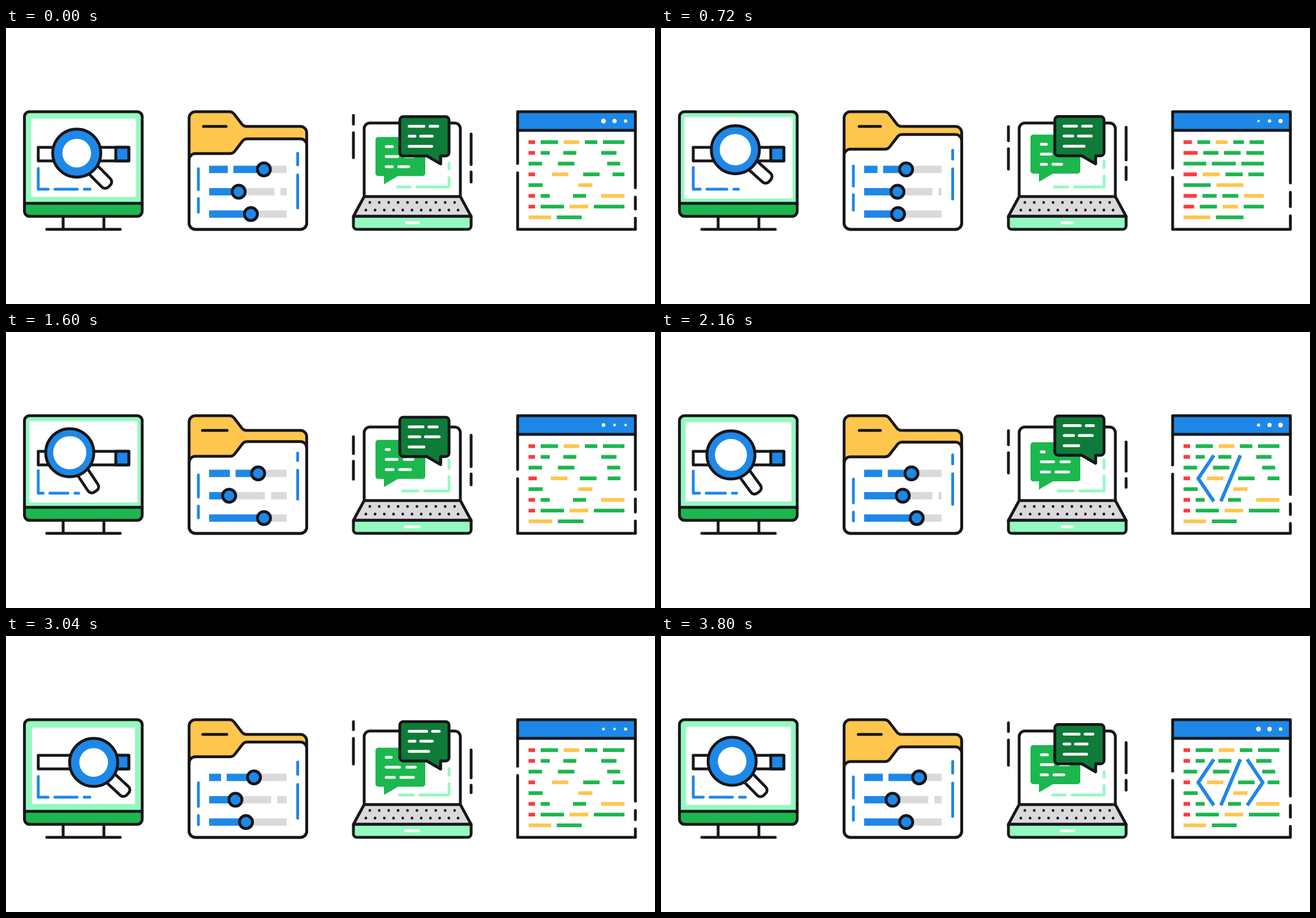
Animation of 1147 by 488 pixels, one loop 3.84 s. Source, as an HTML page with a canvas:

```html
<!DOCTYPE html>
<html lang="en">
<head>
<meta charset="utf-8">
<title>Four icons</title>
<style>
html, body { margin: 0; width: 100%; height: 100%; overflow: hidden; background: #fff; }
canvas { display: block; }
</style>
</head>
<body>
<canvas id="stage" width="1147" height="488"></canvas>
<script>
const ctx = document.getElementById('stage').getContext('2d');
const INK = '#17161a', BLUE = '#1e88e8', GREEN = '#1cb74e', MINT = '#94f9bf', DARK = '#0f7b38',
      YELLOW = '#ffc64d', GRAY = '#dadada', KEYS = '#dbd9da', RED = '#ff3b3d', WHITE = '#fff';
const LOOP = 3840;
let now = 0;

// Cosine swing from -1 to 1; peak is the part of the loop where it is highest
const swing = (peak, cycles = 1) => Math.cos(2 * Math.PI * cycles * (now / LOOP - peak));

function ease(from, to) {
  const u = Math.min(1, Math.max(0, (now - from) / (to - from)));
  return u * u * (3 - 2 * u);
}

function paint(fill, stroke) {
  if (fill) { ctx.fillStyle = fill; ctx.fill(); }
  if (stroke) { ctx.strokeStyle = stroke; ctx.stroke(); }
}

function line(color, ...xy) {
  ctx.beginPath();
  for (let i = 0; i < xy.length; i += 2) ctx.lineTo(xy[i], xy[i + 1]);
  paint(null, color);
}
const across = (color, y, x1, x2) => line(color, x1, y, x2, y);
const down = (color, x, y1, y2) => line(color, x, y1, x, y2);

function box(x1, y1, x2, y2, r, fill, stroke) {
  ctx.beginPath();
  ctx.roundRect(x1, y1, x2 - x1, y2 - y1, r);
  paint(fill, stroke);
}

function disc(x, y, r, fill, stroke) {
  ctx.beginPath();
  ctx.arc(x, y, r, 0, 7);
  paint(fill, stroke);
}

// Polygon with rounded corners
function shape(points, r, fill, stroke) {
  const [ax, ay] = points[0], [bx, by] = points[points.length - 1];
  ctx.beginPath();
  ctx.moveTo((ax + bx) / 2, (ay + by) / 2);
  points.forEach(([x, y], i) => ctx.arcTo(x, y, ...points[(i + 1) % points.length], r));
  ctx.closePath();
  paint(fill, stroke);
}

function monitor() {
  const inset = 43.4 + 2.6 * swing(0.8), wave = swing(0.9);
  box(32.6, 148, 240.7, 333, 9, MINT);
  box(inset, 116 + inset, 274 - inset, 343 - inset, 0, WHITE);
  box(32.6, 310, 240.7, 333, [0, 0, 9, 9], GREEN);
  across(INK, 310, 32.6, 240.7);
  box(32.6, 148, 240.7, 333, 9, null, INK);
  down(INK, 101, 333, 355);
  down(INK, 173, 333, 355);
  across(INK, 356, 72, 202);

  const turn = 70.5 + 5 * wave, dash = turn + 12, dot = dash + 48.5 + 4.2 * wave;
  line(BLUE, 57, 247 + 2 * wave, 57, 285, turn, 285);
  across(BLUE, 285, dash, dot - 12.5);
  across(BLUE, 285, dot, dot + 8.5 + 2 * wave);

  box(57, 211, 217, 235, 0, WHITE, INK);
  box(194, 211, 217, 235, 0, BLUE, INK);

  ctx.save();
  ctx.translate(131.4 + 14 * swing(0.817) + 12.2 * swing(0.24, 2), 218.3 + 5.5 * swing(0.84));
  ctx.save();
  ctx.rotate((47.4 + 5.9 * swing(0.48) + 4.2 * swing(0.463, 2)) * Math.PI / 180);
  box(38, -10.5, 82, 10.5, [0, 8, 8, 0], WHITE, INK);
  ctx.restore();
  disc(0, 0, 42.5, BLUE, INK);
  disc(0, 0, 27.1 - 2.2 * wave, WHITE);
  ctx.restore();
}

function slider(y, knob, ...pieces) {
  for (const [color, x1, x2] of pieces) box(x1, y - 6.5, x2, y + 6.5, 0, color);
  disc(knob, y, 11.5, BLUE, INK);
}

function folder() {
  const sheet = (top, step, bend) => shape([[323.6, top], [bend, top], [bend + 20, step],
    [531.4, step], [531.4, 356], [323.6, 356]], 11, top > 148 ? WHITE : YELLOW, INK);
  const front = 217.5 + 4.5 * swing(0, 2), label = 20.2 - 2 * swing(0.12, 2);
  sheet(148, 174, 400);
  sheet(front, front - 26, 401);
  across(INK, 174, 369 - label, 369 + label);

  const quick = swing(0.47, 2);
  const split = 387.3 + 7 * quick - 3.2 * swing(0.85);
  const a = 442.1 + 4.5 * swing(0.95) + 10.1 * quick;
  const b = 411 + 18 * swing(0.12, 2) + 5 * swing(0.72), stop = Math.min(479.5, b + 63);
  const c = 435 + 13.3 * swing(0.5) + 12 * quick;
  slider(250, a, [BLUE, 359, split], [BLUE, split + 10, a], [GRAY, a, 496]);
  slider(289.5, b, [BLUE, 359, b], [GRAY, b, stop], [GRAY, stop + 11, 496]);
  slider(329, c, [BLUE, 359, c], [GRAY, c, 496]);

  const left = swing(0.67), right = swing(0.86);
  down(BLUE, 340, 253 + 9 * left, 292 + 12.7 * left);
  down(BLUE, 340, 308 + 13.3 * left, 328.7 + 6.7 * left);
  down(BLUE, 515.5, 218.5 + 4.7 * right, 236 + 9.3 * right);
  down(BLUE, 515.5, 253.5 + 9.8 * right, 309 + 14.5 * right);
}

function laptop() {
  const a = swing(0), b = swing(0.74), c = swing(0.67), d = swing(0.4), e = swing(0.375);
  box(633, 168, 803, 310, 10, WHITE, INK);

  const run = 733.5 - 7.3 * a;
  down(MINT, 783, 232.5 + 7 * a, 245 + 4.3 * a);
  line(MINT, 783, 259.7 + 4.7 * a, 783, 281, run, 281);
  across(MINT, 281, 697 - 5 * a, run - 12);

  // Light bubble
  const y = 193 + 4.8 * b, gap = 692.4 + 3.3 * b, end = 684.2 + 3 * c;
  box(653, y, 741, y + 69, 5, GREEN);
  shape([[668, y + 66], [668, y + 83.5], [696, y + 67]], 0, GREEN);
  across(WHITE, y + 17, 672, 680 + 2.9 * a);
  across(WHITE, y + 34.5, 672, gap);
  across(WHITE, y + 34.5, gap + 13, 720.5 + 3 * b);
  across(WHITE, y + 52.5, 672, end);
  across(WHITE, y + 52.5, end + 11.5, 715 + 7 * c);

  // Dark bubble
  const top = 152.9 + 4.5 * swing(0.09), foot = top + 69.5, pause = 726.6 + 4.8 * d;
  box(696, top, 783, foot, 6, DARK, INK);
  line(INK, 744, foot, 768, foot + 14, 768, foot);
  shape([[744, foot], [768, foot + 14], [768, foot - 4], [744, foot - 4]], 0, DARK);
  line(INK, 744, foot, 768, foot + 14, 768, foot);
  across(WHITE, top + 17, 712.5, 739 + 4.8 * b);
  across(WHITE, top + 17, 749.5 + 4.7 * b, 763.2 + 2.5 * b);
  across(WHITE, top + 34.5, 712.5, pause);
  across(WHITE, top + 34.5, pause + 10, 758.8 + 6.8 * d);
  across(WHITE, top + 52.5, 712.5, 745 + 7.3 * a);

  shape([[633, 298], [803, 298], [822, 333], [614, 333]], 0, KEYS, INK);
  for (let i = 0; i < 10; i++) disc(643 + i * 16.65, 308.5, 2.4, INK);
  for (let i = 0; i < 11; i++) disc(636 + i * 16.3, 322, 2.4, INK);
  box(614, 333, 822, 356, [0, 0, 6, 6], MINT, INK);
  const notch = 10.6 - 2.2 * swing(0.12, 2);
  across(WHITE, 344.5, 718 - notch, 718 + notch);

  down(INK, 614, 167.5 + 18.5 * e, 189 + 27 * e);
  down(INK, 614, 203.5 + 26 * e, 242.3 + 18.5 * e);
  down(INK, 822, 188.5 + 13.7 * b, 242 + 9.3 * b);
  down(INK, 822, 255 + 9.3 * b, 272.5 + 4.8 * b);
}

// Bars by colour initial and width, 10 apart; "_" adds space
const CODE = [
  'R11.5 G30.5 Y27.5 G22 G38',
  'R11.5 G16 _14 G23 _34 G27',
  'G24 _18 G29 _48 G23',
  'R11.5 _20 Y29 _16 G29 _13 G21',
  'G25 _53 Y25',
  'R11.5 G16 _31 G23 _17 Y41',
  'R11.5 G41 Y33 G54',
  'Y40 G44',
].map(row => row.split(' ').map(word => ({ kind: word[0], size: +word.slice(1) })));
const COLORS = { R: RED, G: GREEN, Y: YELLOW };

// Bars drift to similar widths without extra space, then settle again in three groups
function codeRow(words, row) {
  const bars = words.filter(word => word.kind !== '_'), n = bars.length;
  const mean = bars.reduce((sum, bar) => sum + bar.size, 0) / n;
  const even = Math.min(48, (152 - 10 * n) / n);
  const start = 720 + 280 * Math.max(0, row % 4 - 1);
  const calm = 1 - ease(0, 720) + ease(start, start + 480);
  const y = 198.5 + row * 19;
  let x = 923.5;
  for (const { kind, size } of words) {
    if (kind === '_') { x += size * calm; continue; }
    const loose = even + 0.4 * (size - mean), width = loose + (size - loose) * calm;
    box(x, y, x + width, y + 6.6, 0, COLORS[kind]);
    x += width + 10;
  }
}

function editor() {
  const wave = swing(0.74), leftEnd = 239 - 9.3 * wave, rightEnd = 283 + 9.5 * wave;
  down(INK, 904.2, 181, leftEnd);
  line(INK, 904.2, leftEnd + 16.3, 904.2, 356, 1112.3, 356, 1112.3, 336.5 + 4.8 * wave);
  down(INK, 1112.3, 181, rightEnd);
  down(INK, 1112.3, rightEnd + 16.5, 320.3 + 4.8 * wave);
  box(904.2, 148, 1112.3, 181, 0, BLUE, INK);
  for (let i = 0; i < 3; i++) disc(1056 + 19.5 * i, 164.5, 3.2 + 0.95 * swing(-0.05 * i, 3), WHITE);
  CODE.forEach(codeRow);

  ctx.lineCap = 'butt';
  ctx.lineJoin = 'miter';
  ctx.lineWidth = 6.2;
  const shown = start => now >= start && now < 2800 || now >= start + 1200;
  if (shown(1960)) line(BLUE, 977, 218, 949.5, 259, 977, 299.5);
  if (shown(2120)) line(BLUE, 1024, 218, 989.5, 299.5);
  if (shown(2280)) line(BLUE, 1036, 218, 1063.5, 259, 1036, 299.5);
}

function draw() {
  now = performance.now() % LOOP;
  ctx.fillStyle = WHITE;
  ctx.fillRect(0, 0, 1147, 488);
  for (const icon of [monitor, folder, laptop, editor]) {
    ctx.lineWidth = 5;
    ctx.lineCap = ctx.lineJoin = 'round';
    icon();
  }
  requestAnimationFrame(draw);
}
draw();
</script>
</body>
</html>
```
